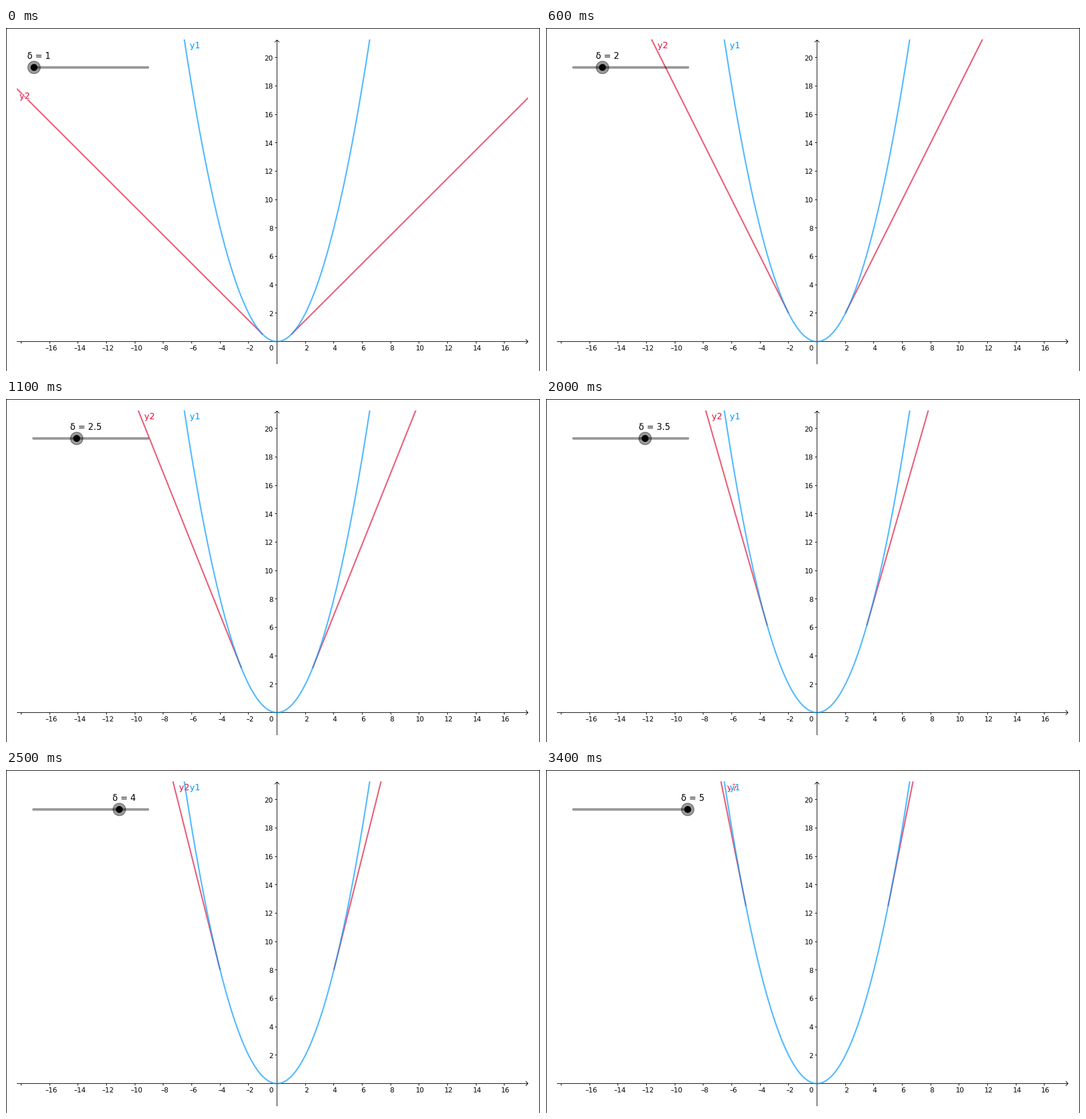
A matplotlib script for the animation above (3.9 s loop, 933x600 px).

```python
import numpy as np
import matplotlib.pyplot as plt
from matplotlib.animation import FuncAnimation
from matplotlib.patches import Circle, Rectangle
from matplotlib.patheffects import withStroke

W, H, DPI = 933, 600, 64
PX = 72 / DPI                      # points per pixel
OX, OY, UNIT = 473.5, 548.5, 24.83  # plot origin and scale in pixels
LEFT, TOP, RIGHT, BOTTOM = 19, 20, 912, 588
BLUE, RED = "#0099ff", "#dc143c"
STEP_MS = 100
SWITCH_MS = [200, 600, 1100, 1600, 2000, 2500, 2900, 3400]
LOOP_MS = 3900

plt.rcParams["font.family"] = "DejaVu Sans"
fig = plt.figure(figsize=(W / DPI, H / DPI), dpi=DPI, facecolor="white")
ax = fig.add_axes([0, 0, 1, 1])
ax.set_xlim(0, W)
ax.set_ylim(H, 0)
ax.axis("off")

plot_area = Rectangle((LEFT, BOTTOM), RIGHT - LEFT, TOP - BOTTOM,
                      transform=ax.transData)


def sx(x):
    return OX + UNIT * x


def sy(y):
    return OY - UNIT * y


def stroke(xs, ys, color="black", width=1.0, **kw):
    kw.setdefault("solid_capstyle", "butt")
    return ax.plot(xs, ys, color=color, lw=width * PX, **kw)[0]


def hline(x0, x1, row):
    """One-pixel line filling the given pixel row."""
    stroke([x0, x1], [row + 0.5] * 2, snap=False)


def vline(col, y0, y1):
    """One-pixel line filling the given pixel column."""
    stroke([col + 0.5] * 2, [y0, y1], snap=False)


def write(x, y, s, size, color="black", ha="left", **kw):
    return ax.text(x, y, s, fontsize=size * PX, color=color, ha=ha,
                   va="baseline", **kw)


def curve(color, z):
    line = stroke([], [], color, 2.5, alpha=0.66, zorder=z)
    line.set_clip_path(plot_area)
    return line


def curve_label(s, color, z):
    halo = [withStroke(linewidth=2.5 * PX, foreground="white")]
    return write(0, 35.4, s, 15, color, zorder=z, path_effects=halo)


def draw_border():
    vline(0, 0, H)
    vline(W - 1, 0, H)
    hline(0, W, 0)


def draw_axes():
    hline(LEFT, RIGHT, int(OY))
    vline(int(OX), 21, BOTTOM)
    stroke([908, RIGHT, 908], [OY - 4, OY, OY + 4])
    stroke([OX - 4, OX, OX + 4], [25, 21, 25])
    for v in range(-18, 18, 2):
        if v == 0:
            continue
        x = sx(v)
        vline(int(x), OY, OY + 3.5)
        if v > -18:
            s = str(v).replace("-", "\u2013")
            write(x + (1.8 if v > 0 else 2.6), 564.5, s, 12, ha="center")
    for v in range(2, 21, 2):
        y = sy(v)
        hline(OX - 3.5, OX, int(y))
        write(466.7, y + 4.7, str(v), 12, ha="right")
    write(466.7, 564.5, "0", 12, ha="right")


draw_border()
draw_axes()

tangents = curve(RED, 3)
y2_label = curve_label("y2", RED, 4)
parabola = curve(BLUE, 5)
y1_label = curve_label("y1", BLUE, 6)

xs = np.linspace(-7, 7, 281)
parabola.set_data(sx(xs), sy(xs ** 2 / 2))
y1_label.set_x(321)

stroke([48, 248], [69, 69], width=4.5, alpha=0.4, zorder=7, snap=False,
       solid_capstyle="round")
ring = ax.add_patch(Circle((0, 69), 11, fc=(0, 0, 0, 0.4), ec=(0, 0, 0, 0.5),
                           lw=PX, zorder=8))
knob = ax.add_patch(Circle((0, 69), 6, fc="black", ec="none", zorder=9))
delta_label = write(0, 53.5, "", 15, zorder=9)


def place_y2_label(d):
    y_max = (OY - TOP) / UNIT
    x_top = sx(-(y_max / d + d / 2))
    if x_top > LEFT:
        y2_label.set_position((x_top + 10.5, 35.4))
    else:
        edge = sy(d * ((OX - LEFT) / UNIT - d / 2))
        y2_label.set_position((LEFT + 4.5, edge + 17.5))


def update(i):
    step = np.searchsorted(SWITCH_MS, i * STEP_MS, side="right")
    d = 1 + 0.5 * step

    x = np.array([-20, -d, np.nan, d, 20])
    tangents.set_data(sx(x), sy(d * (np.abs(x) - d / 2)))
    place_y2_label(d)

    kx = 49 + 2 * UNIT * (d - 1)
    ring.center = knob.center = (kx, 69)
    delta_label.set_x(kx - 11.6)
    delta_label.set_text(f"\u03b4 = {d:g}")
    return tangents, y2_label, ring, knob, delta_label


anim = FuncAnimation(fig, update, frames=LOOP_MS // STEP_MS,
                     interval=STEP_MS, repeat=True, repeat_delay=0)
plt.show()
```
